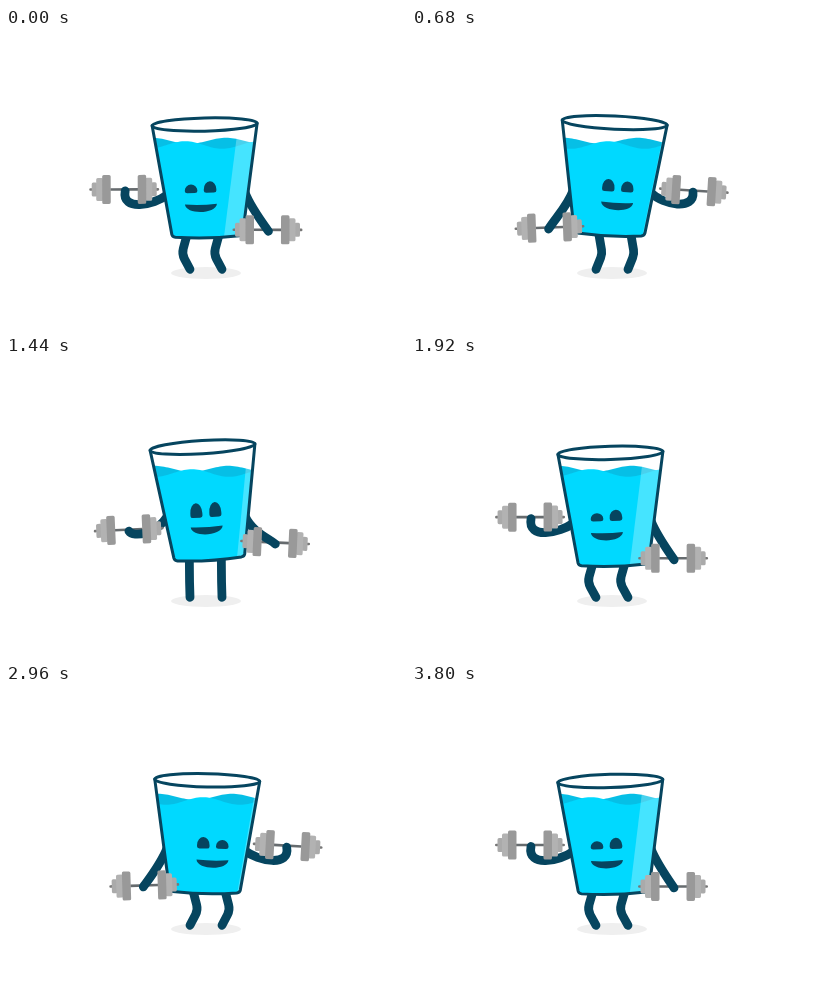
An HTML page with a canvas for the animation above (3840 ms loop, 400 by 300 pixels).

```html
<!DOCTYPE html>
<html lang="en">
<head>
<meta charset="utf-8">
<title>Water workout</title>
<style>
  html, body { margin: 0; width: 100%; height: 100%; overflow: hidden; background: #fff; }
  canvas { display: block; width: 400px; height: 300px; }
</style>
</head>
<body>
<canvas id="stage" width="400" height="300"></canvas>
<script>
const ctx = document.getElementById('stage').getContext('2d');
const LOOP = 3840, REP = 1960, STEP = 40, LEAD = 88;
const INK = '#06455f', WATER = '#00d9ff', DEEP = '#06bfe6';
const TAU = Math.PI * 2;
const mix = (a, b, k) => a + (b - a) * k;

function fill(color, path) {
  ctx.fillStyle = color;
  ctx.beginPath();
  path();
  ctx.fill();
}

function stroke(color, width, path) {
  ctx.strokeStyle = color;
  ctx.lineWidth = width;
  ctx.beginPath();
  path();
  ctx.stroke();
}

function within(x, y, degrees, draw) {
  ctx.save();
  ctx.translate(x, y);
  ctx.rotate(degrees * Math.PI / 180);
  draw();
  ctx.restore();
}

// A cosine that lingers a little at both ends.
function swing(angle) {
  const c = Math.cos(angle);
  return c * (1.25 - 0.25 * c * c);
}

// Everything derives from the angle of one curl repetition.
function poseAt(time) {
  const angle = TAU * (time % LOOP % REP + LEAD) / REP;
  const sway = -swing(angle);
  const lift = Math.sin(angle) ** 2;
  return {
    angle, sway, lift,
    y: 153 - 6.2 * lift,
    tilt: 1.7 * sway + 3.3 * lift * Math.sign(Math.sin(angle))
  };
}

// Arm in left-hand coordinates; the right one is its mirror half a turn later.
function armAt(angle, lift) {
  const low = (1 - swing(angle)) / 2;
  const rising = Math.sin(angle) < 0 ? lift : 0;
  return {
    low, lift,
    x: mix(118, 139, low) - 3.5 * rising,
    y: mix(161, 202.5, low) - 3.5 * rising,
    shoulder: mix(167.5, 165, low) - 6 * lift
  };
}

function drawArm(a) {
  stroke(INK, 8.8, () => {
    ctx.moveTo(161, a.shoulder);
    ctx.bezierCurveTo(mix(148, 156, a.low), mix(177, 178, a.low),
      mix(115, 147, a.low), mix(184, 191, a.low) - 5 * a.lift,
      a.x + mix(1, -1, a.low), a.y + 1.5);
  });
}

function drawBar(a, tilt) {
  within(a.x, a.y, tilt, () => fill('#666b6e', () => ctx.rect(-14, -1.3, 28, 2.6)));
}

function drawPlates(a, tilt) {
  within(a.x, a.y, tilt, () => {
    for (const side of [-1, 1]) {
      const plate = (color, from, width, height) => fill(color, () =>
        ctx.roundRect(side > 0 ? from : -from - width, -height / 2, width, height, 1.6));
      plate('#777', 31, 4, 2.6);
      plate('#aaa', 27, 5.5, 14);
      plate('#b2b2b2', 21, 7, 23);
      plate('#999', 13.5, 8.5, 29);
    }
  });
}

function mirrored(draw) {
  ctx.save();
  ctx.translate(400, 0);
  ctx.scale(-1, 1);
  draw();
  ctx.restore();
}

function drawLegs({ sway, y }) {
  for (const foot of [184, 216]) {
    const hip = foot + 3 * sway;
    const knee = foot + 8.5 * sway * Math.abs(sway);
    stroke(INK, 8.8, () => {
      ctx.moveTo(hip, y + 54);
      ctx.arcTo(knee, 226, foot, 241.3, 14);
      ctx.lineTo(foot, 241.3);
    });
  }
}

function cup() {
  ctx.moveTo(-52.5, -56);
  ctx.lineTo(-35.5, 53);
  ctx.quadraticCurveTo(-35, 55.5, -32, 56);
  ctx.quadraticCurveTo(0, 59, 32, 56);
  ctx.quadraticCurveTo(35, 55.5, 35.5, 53);
  ctx.lineTo(52.5, -56);
}

function drawWave(color, level, height, crest) {
  fill(color, () => {
    ctx.moveTo(140, 220);
    for (let x = 140; x <= 260; x += 2)
      ctx.lineTo(x, level - height * Math.cos(TAU * (x - crest) / 74));
    ctx.lineTo(260, 220);
  });
}

function drawFace({ sway, lift }) {
  const x = 0.7 + 6.5 * sway;
  const base = 12 + 2.3 * lift;
  const w = mix(12.6, 12, lift);
  for (const side of [-1, 1]) {
    const h = mix(9.5 - side * 1.5 * sway, 14.8, lift);
    const top = { x: w / 2, y: h * 0.7 };
    const foot = { x: 2.5, y: 2 };
    fill(INK, () => ctx.roundRect(x + side * 9.5 - w / 2, base - h, w, h, [top, top, foot, foot]));
  }
  fill(INK, () => {
    ctx.moveTo(x - 16, 23.5);
    ctx.quadraticCurveTo(x, 25, x + 16, 23.5);
    ctx.bezierCurveTo(x + 15, 34, x - 15, 34, x - 16, 23.5);
  });
}

function drawGlass(pose) {
  const { sway, lift, y, tilt } = pose;
  const inGlass = draw => within(200, y, tilt, draw);
  const rim = () => ctx.ellipse(0, -56, 52.5, 6.6, 0, 0, TAU);

  ctx.save();
  inGlass(() => {
    fill('#fff', cup);
    fill('#fff', rim);
    ctx.beginPath();
    cup();
  });
  ctx.clip();
  // The water stays level while the glass moves around it.
  drawWave(DEEP, 112.8, 3, 223 + 3 * sway);
  drawWave(WATER, 117, 3.8, 188 + 9 * sway);
  const shine = 10.5 - 8 * sway - 5.5 * lift;
  inGlass(() => fill('rgba(255,255,255,.27)', () => {
    const top = 111 - y;
    ctx.moveTo(49.5 - shine, top);
    ctx.lineTo(60, top);
    ctx.lineTo(60, 60);
    ctx.lineTo(34 - shine, 60);
  }));
  ctx.restore();

  inGlass(() => {
    stroke(INK, 3, cup);
    stroke(INK, 3, rim);
    drawFace(pose);
  });
}

function draw(time) {
  const pose = poseAt(time);
  const left = armAt(pose.angle, pose.lift);
  const right = armAt(pose.angle + Math.PI, pose.lift);
  const leftTilt = -1.5 * left.low - 2 * pose.lift;
  const rightTilt = -3 * (1 - right.low) - 1.5 * pose.lift;

  ctx.fillStyle = '#fff';
  ctx.fillRect(0, 0, 400, 300);
  ctx.lineCap = ctx.lineJoin = 'round';
  fill('#efefef', () => ctx.ellipse(200, 245, 35, 6, 0, 0, TAU));

  drawLegs(pose);
  drawBar(left, leftTilt);
  drawArm(left);
  mirrored(() => {
    drawBar(right, rightTilt);
    drawArm(right);
  });
  drawGlass(pose);
  drawPlates(left, leftTilt);
  mirrored(() => drawPlates(right, rightTilt));
}

const start = performance.now();
function tick() {
  const time = performance.now() - start;
  draw(Math.floor(time / STEP) * STEP);
  requestAnimationFrame(tick);
}
tick();
</script>
</body>
</html>
```
